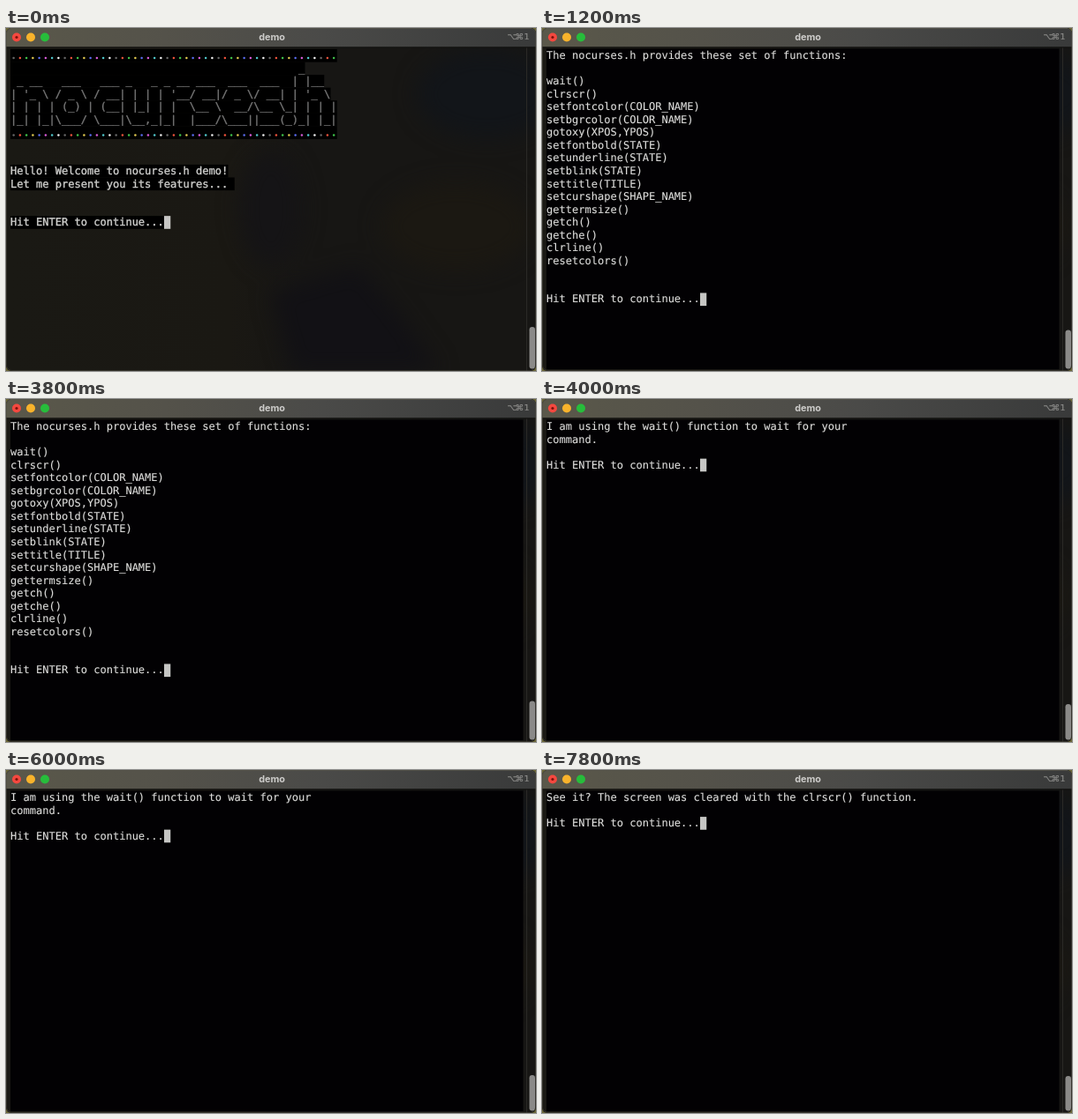
Write an HTML page that moves like this. It is 600 px wide and 389 px high and loops after 8 s.

```html
<!DOCTYPE html>
<html lang="en">
<head>
<meta charset="utf-8">
<title>demo</title>
<style>
  html, body { margin: 0; width: 100%; height: 100%; overflow: hidden; background: #6b6738; }
  svg { display: block; width: 600px; height: 389px; }
  .term text { font: 12.04px "DejaVu Sans Mono", monospace; white-space: pre; fill: #dededc; stroke: #dededc; stroke-width: .12; text-rendering: geometricPrecision; }
  .term .intro text { fill: #d0d0ce; stroke: #d0d0ce; stroke-width: .35; }
  .term .intro .art { fill: #777; stroke: #777; }
  .title { font: 700 10.8px Inter, sans-serif; fill: #cdccca; text-anchor: middle; }
  .keys { font: 9.5px "DejaVu Sans", sans-serif; fill: #8b8b89; stroke: #8b8b89; stroke-width: .2; }
</style>
</head>
<body>
<svg viewBox="0 0 600 389">
  <defs>
    <linearGradient id="bar">
      <stop offset="0" stop-color="#5a584a"/>
      <stop offset=".3" stop-color="#54524a"/>
      <stop offset=".6" stop-color="#4a4a48"/>
      <stop offset="1" stop-color="#393a3a"/>
    </linearGradient>
    <linearGradient id="glass">
      <stop offset="0" stop-color="#1a1914"/>
      <stop offset=".42" stop-color="#1a1813"/>
      <stop offset=".56" stop-color="#171614"/>
      <stop offset="1" stop-color="#171614"/>
    </linearGradient>
    <filter id="soft" x="-50%" y="-50%" width="200%" height="200%" color-interpolation-filters="sRGB">
      <feGaussianBlur stdDeviation="12"/>
    </filter>
    <clipPath id="window"><rect width="600" height="389" rx="6"/></clipPath>
  </defs>
  <g clip-path="url(#window)">
    <rect width="600" height="389" fill="url(#glass)"/>
    <g filter="url(#soft)">
      <ellipse cx="545" cy="75" rx="80" ry="50" fill="#121519"/>
      <ellipse cx="300" cy="205" rx="35" ry="65" fill="#151416"/>
      <ellipse cx="510" cy="225" rx="85" ry="50" fill="#1b1812"/>
      <path d="M300 300L400 270L445 325L490 389H325Z" fill="#121115"/>
    </g>
    <g class="term" id="term"></g>
    <path d="M589.5 22V389" stroke="#2b2a27"/>
    <rect id="thumb" x="592.5" width="6.5" rx="3.2" fill="#8b8a88"/>
    <rect width="600" height="21.5" fill="url(#bar)"/>
    <path d="M0 22H600" stroke="#11110f"/>
    <path d="M5 .5H595" stroke="#6b6a62" opacity=".6"/>
    <circle cx="12" cy="10.5" r="5" fill="#f4483f"/>
    <circle cx="12" cy="10.5" r="1.6" fill="#7c120c"/>
    <circle cx="28" cy="10.5" r="5" fill="#f8b32b"/>
    <circle cx="44" cy="10.5" r="5" fill="#27bd3b"/>
    <text class="title" x="301" y="14">demo</text>
    <g class="keys">
      <text x="567.5" y="13">⌥</text>
      <text x="576.5" y="13">⌘</text>
      <text x="586.5" y="13">1</text>
    </g>
    <rect x=".5" y=".5" width="599" height="388" rx="6" fill="none" stroke="#4a483e" opacity=".6"/>
  </g>
</svg>
<script>
const LOOP = 8000, LEFT = 5, TOP = 24, CELL = 7.25, LINE = 14.55, BASELINE = 11;
const PROMPT = 'Hit ENTER to continue...';
const DOT_COLORS = ['#666', '#f0523c', '#3fc24a', '#e0c850', '#5a6cf0', '#d75ad7', '#50c8cc', '#f0f0f0'];
const DOTS = '.'.repeat(51);

const banner = String.raw`
                                             _
 _ __   ___   ___ _   _ _ __ ___  ___  ___  | |__
| '_ \ / _ \ / __| | | | '__/ __|/ _ \/ __| | '_ \
| | | | (_) | (__| |_| | |  \__ \  __/\__ \_| | | |
|_| |_|\___/ \___|\__,_|_|  |___/\___||___(_)_| |_|`.split('\n').slice(1);

const THUMB_BOTTOM = 386.5;
const screens = [
  { start: 0, thumbTop: 339, intro: true,
    lines: [DOTS, ...banner, DOTS, '', '', 'Hello! Welcome to nocurses.h demo!',
      'Let me present you its features... ', '', '', PROMPT] },
  { start: 1200, thumbTop: 342.5,
    lines: ['The nocurses.h provides these set of functions:', '',
      'wait()', 'clrscr()', 'setfontcolor(COLOR_NAME)', 'setbgrcolor(COLOR_NAME)',
      'gotoxy(XPOS,YPOS)', 'setfontbold(STATE)', 'setunderline(STATE)', 'setblink(STATE)',
      'settitle(TITLE)', 'setcurshape(SHAPE_NAME)', 'gettermsize()', 'getch()', 'getche()',
      'clrline()', 'resetcolors()', '', '', PROMPT] },
  { start: 4000, thumbTop: 346,
    lines: ['I am using the wait() function to wait for your', 'command.', '', PROMPT] },
  { start: 7000, thumbTop: 347,
    lines: ['See it? The screen was cleared with the clrscr() function.', '', PROMPT] },
];

const term = document.getElementById('term');
const thumb = document.getElementById('thumb');

function add(parent, name, attrs, text) {
  const node = document.createElementNS('http://www.w3.org/2000/svg', name);
  for (const key in attrs) node.setAttribute(key, attrs[key]);
  if (text) node.textContent = text;
  return parent.appendChild(node);
}

function cells(parent, row, col, count, fill) {
  add(parent, 'rect', { x: LEFT + col * CELL, y: TOP + row * LINE, width: count * CELL, height: LINE + 0.1, fill });
}

function dotRow(parent, y) {
  for (let i = 0; i < DOTS.length; i++) {
    add(parent, 'circle', { cx: LEFT + (i + 0.5) * CELL, cy: y - 0.9, r: 1.25, fill: DOT_COLORS[i % DOT_COLORS.length] });
  }
}

function buildScreen({ lines, intro }) {
  const group = add(term, 'g', { class: intro ? 'intro' : '' });
  if (!intro) add(group, 'rect', { x: 5, y: 23.5, width: 580.5, height: 363.5, fill: '#020103' });
  lines.forEach((line, row) => {
    if (!line) return;
    if (intro) cells(group, row, 0, line.length, '#000');
    const y = TOP + row * LINE + BASELINE;
    if (line === DOTS) dotRow(group, y);
    else add(group, 'text', { x: LEFT, y, class: banner.includes(line) ? 'art' : '' }, line);
  });
  cells(group, lines.length - 1, PROMPT.length, 1, '#c6c6c4');
  return group;
}

const groups = screens.map(buildScreen);

function render(time) {
  const current = screens.findLastIndex(s => time >= s.start);
  groups.forEach((g, i) => g.setAttribute('display', i === current ? 'inline' : 'none'));
  const { thumbTop } = screens[current];
  thumb.setAttribute('y', thumbTop);
  thumb.setAttribute('height', THUMB_BOTTOM - thumbTop);
}

const begin = performance.now();
function tick() {
  render((performance.now() - begin) % LOOP);
  requestAnimationFrame(tick);
}
tick();
</script>
</body>
</html>
```
